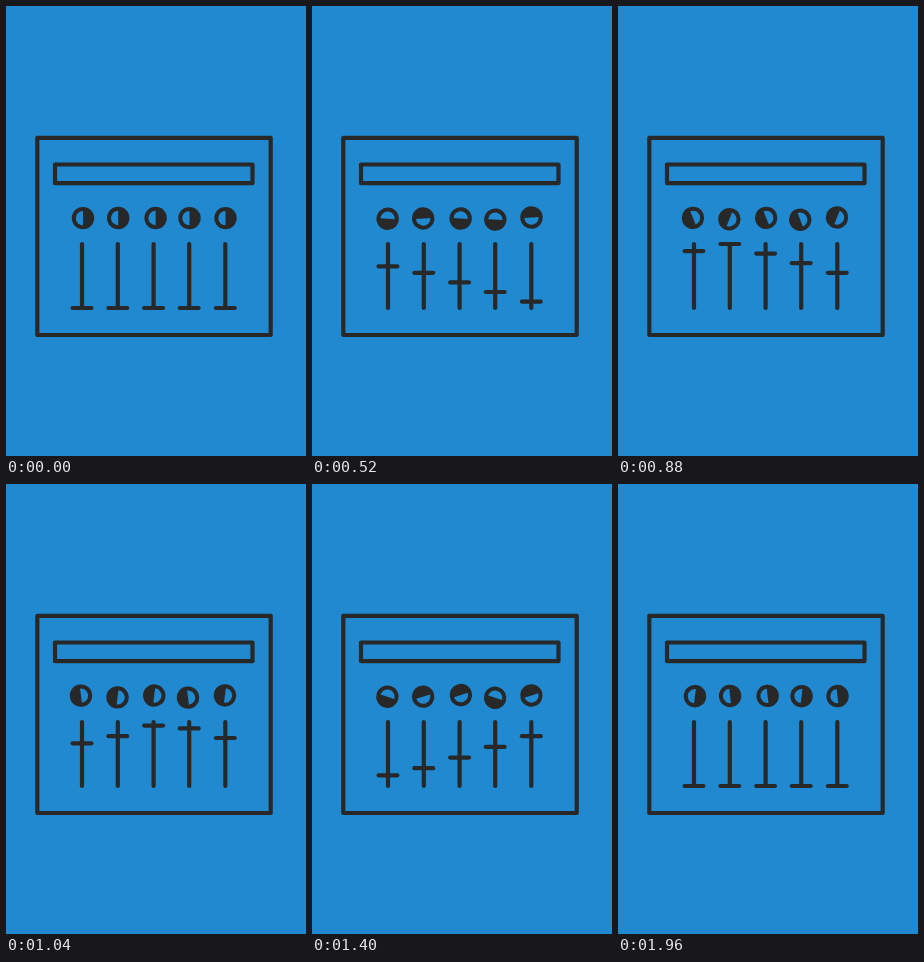
These frames come from a looping animation (300x450 px, 2000 ms). An HTML page:

```html
<!DOCTYPE html>
<html lang="en">
<head>
<meta charset="utf-8">
<title>Mixer</title>
<style>
  html, body { margin: 0; width: 100%; height: 100%; overflow: hidden; background: #2089cf; }
  svg { display: block; width: 100%; height: 100%; }
  .line { fill: none; stroke: #292828; stroke-width: 4.2; stroke-linecap: round; stroke-linejoin: round; }
  .disc { fill: #292828; }
  .half { fill: #2089cf; }
</style>
</head>
<body>
<svg viewBox="0 0 300 450">
  <rect class="line" x="31.3" y="131.8" width="233.4" height="197.2"/>
  <rect class="line" x="49" y="158.5" width="197.5" height="18.7"/>
  <g id="parts"></g>
</svg>
<script>
const LOOP = 2000, STEP = 40;
const RISE = 800, FALL = 720;
const TOP = 238, BOTTOM = 302;

// x, start: fader; pivot, off: knob centre and its eccentricity;
// turn: direction; full: whole turns instead of swinging back
const channels = [
  { x: 76,    start: 0,   pivot: [76, 211.8],    off: [1, 0.3],    turn: 1 },
  { x: 111.8, start: 80,  pivot: [111.9, 212.7], off: [0.3, -0.7], turn: -1 },
  { x: 147.6, start: 200, pivot: [148.9, 211.8], off: [0.7, 0.2],  turn: 1, full: true },
  { x: 183.2, start: 320, pivot: [182.7, 212.8], off: [0.8, -0.7], turn: 1 },
  { x: 219.3, start: 440, pivot: [219.2, 211.8], off: [0.3, 0.3],  turn: -1 }
];

const parts = document.getElementById("parts");

function add(parent, tag, attrs) {
  const el = document.createElementNS("http://www.w3.org/2000/svg", tag);
  for (const key in attrs) el.setAttribute(key, attrs[key]);
  return parent.appendChild(el);
}

for (const c of channels) {
  add(parts, "path", { class: "line", d: `M${c.x} ${TOP}V${BOTTOM}` });
  c.bar = add(parts, "path", { class: "line", d: `M${c.x - 9.4} 0h18.8` });
  c.knob = add(parts, "g", {});
  const [x, y] = c.off;
  add(c.knob, "circle", { class: "disc", cx: x, cy: y, r: 11.2 });
  add(c.knob, "path", { class: "half", d: `M${x} ${y - 7.2}a7.2 7.2 0 0 0 0 14.4z` });
}

function faderY(t) {
  const range = BOTTOM - TOP;
  if (t <= 0 || t >= RISE + FALL) return BOTTOM;
  return t < RISE ? BOTTOM - range * t / RISE : TOP + range * (t - RISE) / FALL;
}

function knobAngle(t, c) {
  const p = 2 * t / LOOP;
  return 180 * c.turn * (c.full || p < 1 ? p : 2 - p);
}

function draw(t) {
  for (const c of channels) {
    c.bar.setAttribute("transform", `translate(0 ${faderY(t - c.start)})`);
    c.knob.setAttribute("transform", `translate(${c.pivot}) rotate(${knobAngle(t, c)})`);
  }
}

const begin = performance.now();
function tick() {
  const t = (performance.now() - begin) % LOOP;
  draw(Math.floor(t / STEP) * STEP);
  requestAnimationFrame(tick);
}
draw(0);
requestAnimationFrame(tick);
</script>
</body>
</html>
```
